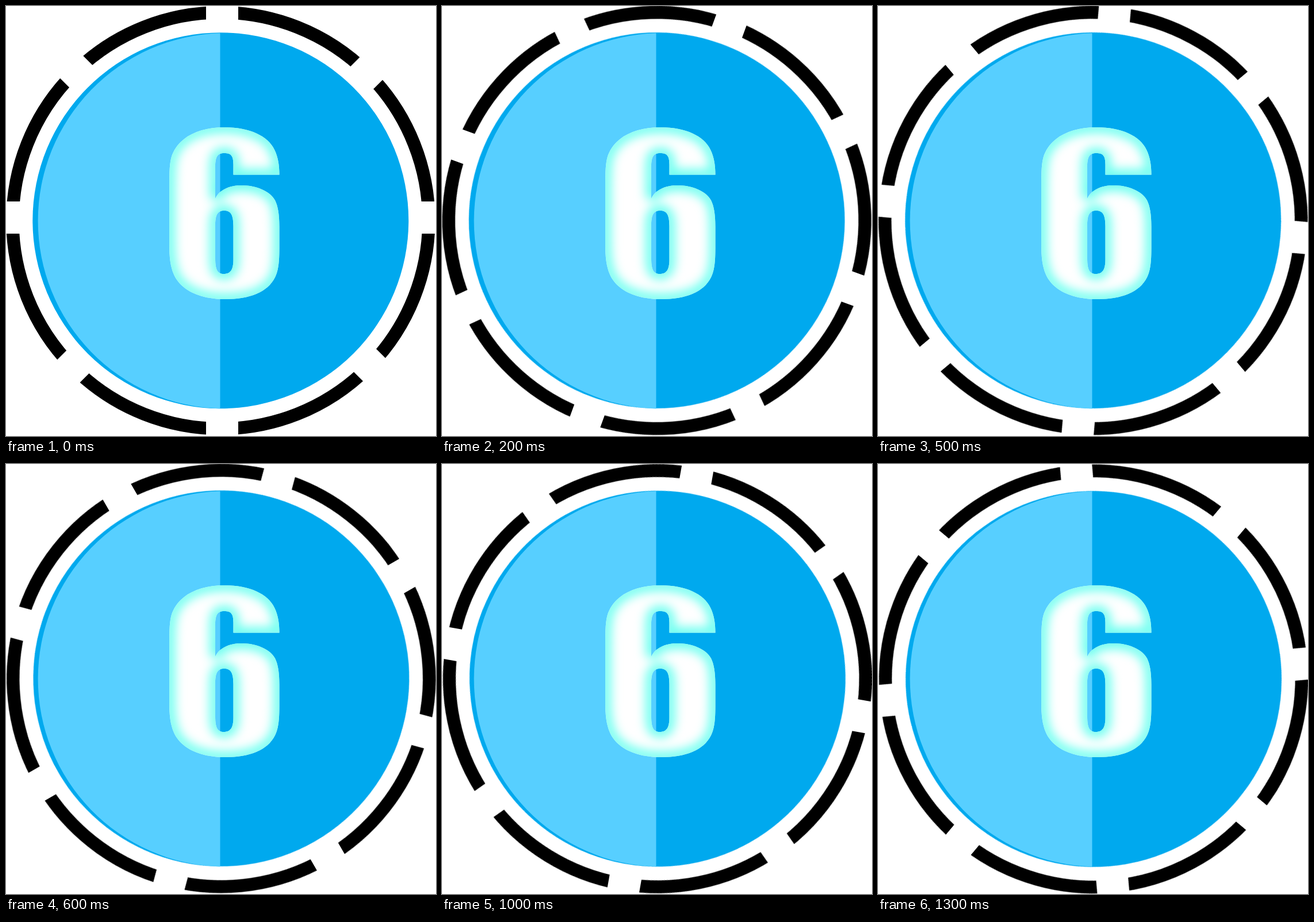
Animation, 748 px wide and 748 px high, one loop 1400 ms. Source, as an HTML page:

```html
<!DOCTYPE html>
<html lang="en">
<head>
<meta charset="utf-8">
<title>Countdown dial</title>
<style>
  html, body { margin: 0; width: 100%; height: 100%; overflow: hidden; background: #fff; }
  svg { display: block; width: 100%; height: 100%; }
  .dial { transform-origin: 374px 374px; animation: spin 1.4s steps(14, end) infinite; }
  .ring { fill: none; stroke: #000; stroke-width: 22.4; }
  .gaps { fill: none; stroke: #fff; stroke-width: 56; }
  .dark { fill: #00a9ee; }
  .light { fill: #57cfff; }
  .glow { fill: none; stroke: #6ffff0; stroke-width: 20; filter: url(#soft); }
  @keyframes spin { to { transform: rotate(140deg); } }
</style>
</head>
<body>
<svg viewBox="0 0 748 748" role="img" aria-label="6">
  <defs>
    <path id="six" clip-rule="evenodd" fill-rule="evenodd" d="
      M475.5 293.5 H395.5 V276 C395.5 261 392 256 379.500 256 C368 256 364 262 364 280
      V335 C371 320 388 312 410 312 C437 312 460 323 468 338 C473 348 475.500 362 475.500 384
      V421 C475.500 447 473.500 461 468 472 C455 498 424 510 381 510
      C336 510 304 494 292 467 C286 453 284 437 284 414
      V314 C284 284 285 270 289 259 C301 228 335 211 381 211
      C423 211 456 226 467 250 C473 262 475.500 276 475.500 293.500 Z
      M379.500 356 C368 356 364 363 364 382 V439 C364 459 368 466 379 466
      C391 466 395.500 458 395.500 441 V383 C395.500 363 391 356 379.500 356 Z"/>
    <clipPath id="inside"><use href="#six" clip-rule="evenodd"/></clipPath>
    <filter id="soft" filterUnits="userSpaceOnUse" x="230" y="160" width="300" height="400"
            color-interpolation-filters="sRGB">
      <feGaussianBlur stdDeviation="9"/>
    </filter>
  </defs>

  <g class="dial">
    <circle class="ring" cx="373.4" cy="373.3" r="362"/>
    <!-- the spokes meet slightly off the ring's centre -->
    <g class="gaps" transform="translate(376 368)">
      <path d="M-420 0H420M0-420V420"/>
      <path d="M-420 0H420M0-420V420" transform="rotate(45)"/>
    </g>
    <circle class="dark" cx="373.3" cy="373.2" r="327"/>
  </g>

  <path class="light" d="M372.500 47.200 A326.800 326.800 0 0 0 372.500 700.500 Z"/>

  <use href="#six" fill="#fff"/>
  <g clip-path="url(#inside)"><use href="#six" class="glow"/></g>
</svg>
</body>
</html>
```
